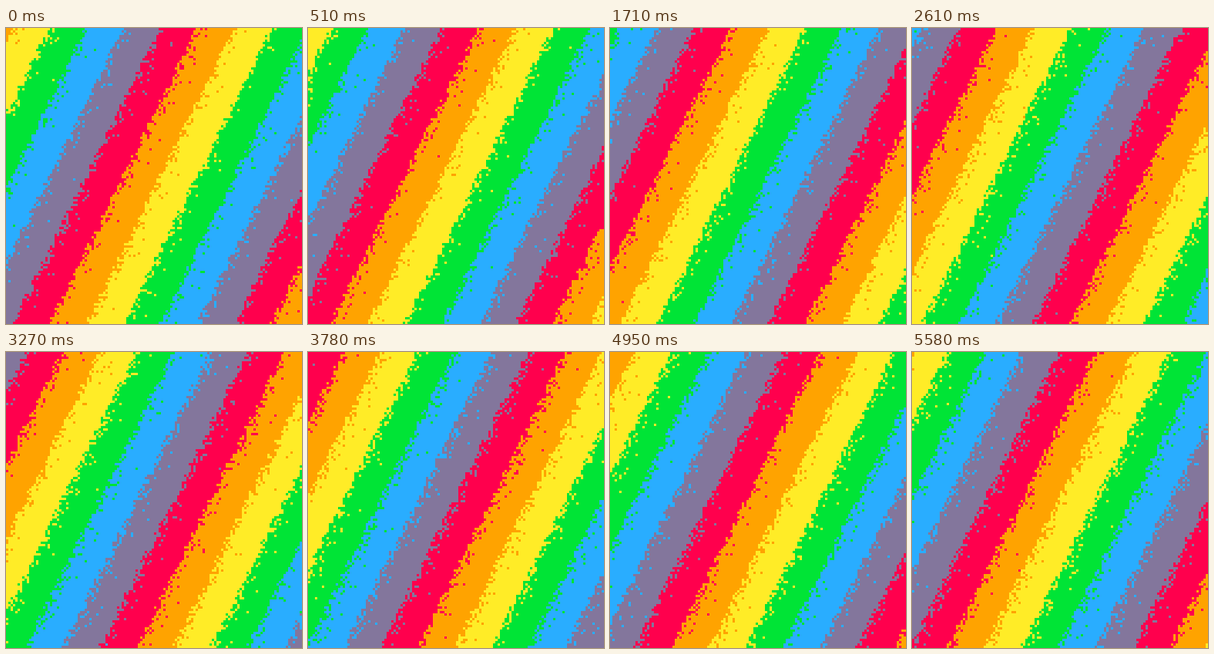
Recreate the animation shown at these times as an HTML page with a canvas. Size 384 px wide and 384 px high, loop 5.61 s.

```html
<!DOCTYPE html>
<html lang="en">
<head>
<meta charset="utf-8">
<title>Rainbow bands</title>
<style>
  html, body { margin: 0; width: 100%; height: 100%; overflow: hidden; background: #000; }
  canvas { display: block; width: 384px; height: 384px; image-rendering: pixelated; }
</style>
</head>
<body>
<canvas id="stage" width="128" height="128"></canvas>
<script>
const SIZE = 128;
const STEP_MS = 30;
const STEPS = 187;
const STEPS_PER_BAND = 30;
const START_BAND = 1.93;
const REFRESH = 0.24; // chance that a cell is repainted in one step
const MAX_AGE = 50;

const palette = ['#ff004d', '#ffa300', '#ffec27', '#00e436', '#29adff', '#83769c']
  .map(hex => {
    const n = parseInt(hex.slice(1), 16);
    return (255 << 24 | (n & 255) << 16 | (n & 0xff00) | n >> 16) >>> 0;
  });

const ctx = document.getElementById('stage').getContext('2d');
const image = ctx.createImageData(SIZE, SIZE);
const cells = new Uint32Array(image.data.buffer);

function random(cell, step) {
  let h = Math.imul(cell + 1, 0x9e3779b1) ^ Math.imul(step + 1000, 0x85ebca6b);
  h = Math.imul(h ^ h >>> 16, 0x7feb352d);
  h = Math.imul(h ^ h >>> 15, 0x846ca68b);
  return ((h ^ h >>> 16) >>> 0) / 4294967296;
}

// Each cell keeps the colour of the last step that repainted it.
function lastPaint(cell, step) {
  const oldest = step - MAX_AGE;
  while (step > oldest && random(cell, step) >= REFRESH) step--;
  return step;
}

function draw(step) {
  for (let y = 0, i = 0; y < SIZE; y++) {
    for (let x = 0; x < SIZE; x++, i++) {
      const shift = lastPaint(i, step) / STEPS_PER_BAND;
      const band = Math.floor(x / 16 + y / 32 + START_BAND + shift);
      cells[i] = palette[(band + 6) % 6];
    }
  }
  ctx.putImageData(image, 0, 0);
}

let shown = -1;
function tick() {
  const step = Math.floor(performance.now() / STEP_MS) % STEPS;
  if (step !== shown) draw(shown = step);
  requestAnimationFrame(tick);
}
tick();
</script>
</body>
</html>
```
